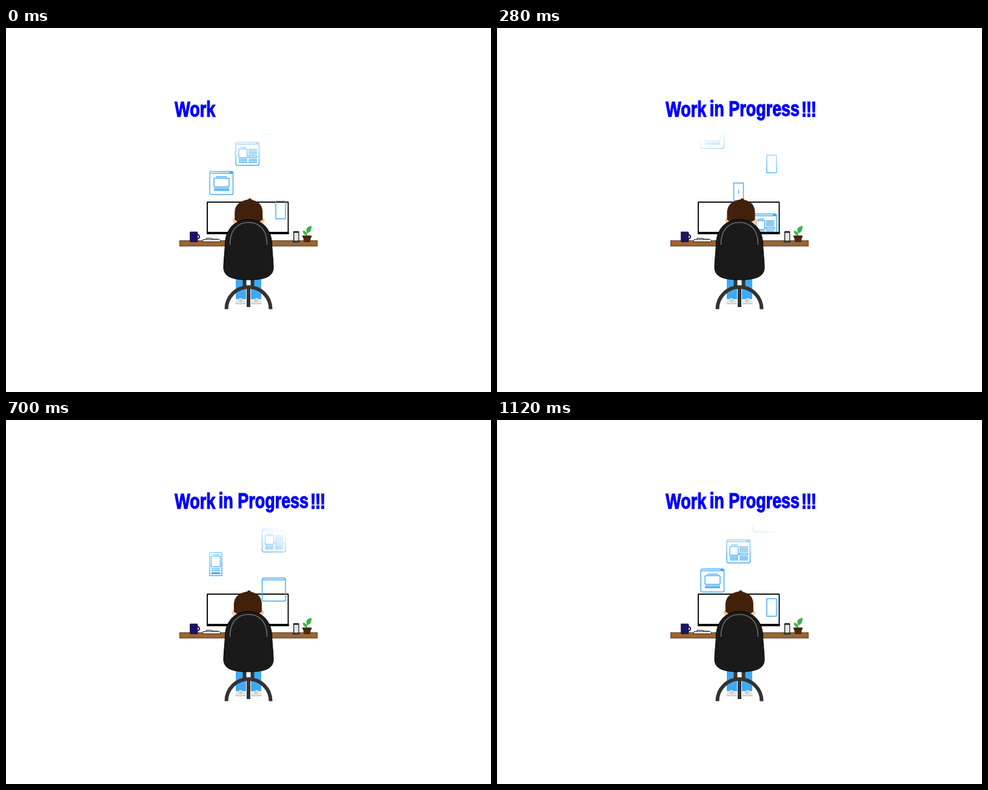
An HTML page for the animation above (1.19 s loop, 800x600 px).

```html
<!DOCTYPE html>
<html lang="en">
<head>
<meta charset="utf-8">
<title>Work in Progress</title>
<style>
  html, body { margin: 0; width: 100%; height: 100%; overflow: hidden; background: #fff; }
  svg { display: block; width: 100vw; height: 100vh; }
  .caption { font: bold 35px "Liberation Sans", Arial, sans-serif; fill: #00f; stroke: #00f; stroke-width: 1.3; }
  .sheet { fill: none; stroke: #3fa9f5; stroke-width: 1.4; }
</style>
</head>
<body>
<svg viewBox="0 0 800 600">
  <defs>
    <clipPath id="view"><rect x="300" y="169" width="200" height="167"/></clipPath>
    <radialGradient id="fade" gradientUnits="userSpaceOnUse" cx="400" cy="300" r="134">
      <stop offset=".56" stop-color="#fff" stop-opacity="0"/>
      <stop offset="1" stop-color="#fff"/>
    </radialGradient>
  </defs>

  <!-- condensed lettering -->
  <g class="caption" id="caption" transform="scale(.77 1)">
    <text x="361.500" y="146">Work</text>
    <text x="455.500" y="144.800">in</text>
    <text x="496.500" y="145.500">Progress</text>
    <text x="652" y="145.700" letter-spacing="-1.300">!!!</text>
  </g>

  <!-- desk and monitor -->
  <rect x="286.500" y="350.500" width="227" height="9" fill="#9b6532" stroke="#61401f"/>
  <rect x="332" y="287" width="133.500" height="52" rx=".5" fill="#fff" stroke="#111" stroke-width="2"/>
  <rect x="331" y="336" width="135.500" height="4" fill="#0b0a0c"/>

  <!-- mug, papers, phone, plant -->
  <circle cx="315.500" cy="344" r="3.600" fill="none" stroke="#1b1464" stroke-width="2"/>
  <rect x="303.500" y="336" width="12.500" height="16.500" rx="1" fill="#1b1464" stroke="#0e0a3c" stroke-width=".7"/>
  <path d="M325 348.500h27l1.500 1.500v2.500h-29zM330 348.500v-2h8l4 1.500h8" fill="#fff" stroke="#222"/>
  <path d="M326 350.500h26" stroke="#bbb"/>
  <rect x="474" y="335" width="9.500" height="18" rx="1" fill="#111"/>
  <rect x="475.300" y="337.500" width="7" height="13" fill="#e6e6e6"/>
  <path d="M472.500 351.500h12v2.500h-12z" fill="#444"/>
  <path d="M496 343V338Q499 334 502 329" fill="none" stroke="#1f9a45" stroke-width="1.200"/>
  <path d="M496.500 338Q492 328 504 326Q504 338 496.500 338Z" fill="#39b54a"/>
  <path d="M496.500 342Q490 341 489.500 334Q496 334 496.500 342Z" fill="#39b54a"/>
  <path d="M489 342h15v3h-1l-1.500 8h-10l-1.500-8h-1z" fill="#512a10"/>
  <path d="M490 345.500h13" stroke="#351a08"/>

  <g clip-path="url(#view)">
    <g class="sheet" id="sheets"></g>
    <rect x="330" y="169" width="140" height="110" fill="url(#fade)"/>
  </g>

  <g id="head">
    <circle cx="378.500" cy="317.500" r="5" fill="#fbc994"/>
    <circle cx="421.500" cy="317.500" r="5" fill="#fbc994"/>
    <path d="M377 316V303Q378 287 397 283Q400 283 401 280.500Q404 281 406 283.500Q422 287 423 302V316Q416 322 400 322T377 316Z" fill="#42210b"/>
  </g>

  <!-- legs and chair -->
  <path d="M379 410h17v37h-17zM404 410h17v37h-17z" fill="#3fa9f5"/>
  <g fill="#e3e3e3">
    <path d="M378.500 455.500v-6l4-2q4-5 8 0l5 2.500v5.500z"/>
    <path d="M404.500 455.500v-5.500l5-2.500q4-5 8 0l4 2v6z"/>
    <path d="M378.500 454.500h17m9 0h17" stroke="#bdbdbd"/>
    <path d="M385 448.500h4m-3 2h3m21-2h4m-3 2h3" stroke="#aaa"/>
  </g>
  <path d="M393.500 412v14M406.500 412v14" stroke="#333" stroke-width="6"/>
  <path d="M363.500 463.500A36.500 36.500 0 0 1 436.500 463.500M400 426v34" fill="none" stroke="#333" stroke-width="6"/>
  <path d="M400 315.500C421 315.500 437 330 438.500 354C439 371 441 382 441 396C440 411 424 415 400 415S360 411 359 396C359 382 361 371 361.500 354C363 330 379 315.500 400 315.500Z" fill="#1a1a1a" stroke="#000"/>
  <path d="M369.500 357.500C369 333 382 320.500 400 320.500S431 333 430.500 357.500" fill="none" stroke="#6b6b6b" stroke-width="1.700"/>
</svg>

<script>
const STEP = 70, STEPS = 17, TRAVEL = 326, EXIT = 125;
const byId = id => document.getElementById(id);

const box = (x, y, w, h, r = 1) => `<rect x="${x}" y="${y}" width="${w}" height="${h}" rx="${r}"/>`;
const lines = (x, w, ...ys) => `<path d="${ys.map(y => `M${x} ${y}h${w}`).join("")}"/>`;
const emptyPage = box(.5, .5, 38.5, 38, 2.5) + lines(.5, 38.5, 3.5);
const page = emptyPage + `<path d="M33 2h5" stroke-width="2.200"/>`;
const landing = page + lines(11, 18, 9) + box(7.5, 11.5, 25, 14.5, 2) +
  lines(7.5, 25, 28.5) + `<path d="M7.500 31h25" stroke-width="2.400"/>`;
const article = page + lines(8, 10, 9) + box(5.5, 11.5, 14, 14.5) +
  lines(5.5, 14, 28.5, 31, 33.5) + lines(21.5, 14, 12, 14.5, 17, 19.5, 28.5, 31, 33.5) +
  box(21.5, 22.5, 14, 3);
const phone = box(.5, .5, 16, 29, .5);
const phoneTick = phone + `<path d="M8.500 12v6"/>`;
const mobile = box(.5, .5, 20, 38) + lines(5, 12, 4) + box(3, 6.5, 15, 17.5) +
  lines(3, 15, 27.5, 30.5) + `<path d="M3 34.500h15" stroke-width="3"/>`;

// y is the height at the start of the loop
const sheets = [
  { x: 335.5, y: 236, art: landing },
  { x: 378.5, y: 188, art: article },
  { x: 422, y: 137, art: emptyPage },
  { x: 444.5, y: 285, art: phone },
  { x: 335.5, y: 421, art: mobile },
  { x: 422, y: 382, art: article },
  { x: 390, y: 331, art: phoneTick }
];
byId("sheets").innerHTML = sheets.map(s => `<g>${s.art}</g>`).join("");
const sheetNodes = [...byId("sheets").children];
const words = [...byId("caption").children];

function draw(time) {
  const step = Math.floor(time / STEP) % STEPS;
  const scroll = 19 * step + (step > 8 ? 13 : 0);
  sheets.forEach(({ x, y }, i) => {
    let top = y - scroll;
    if (top < EXIT) top += TRAVEL;
    sheetNodes[i].setAttribute("transform", `translate(${x} ${top})`);
  });
  words.forEach((word, i) => word.setAttribute("visibility", i <= step ? "visible" : "hidden"));
  const sway = .25 + 2.2 * Math.sin(2 * Math.PI * step / 16.5);
  byId("head").setAttribute("transform", `translate(${sway.toFixed(2)} 0)`);
}

const start = performance.now();
function tick() {
  draw(performance.now() - start);
  requestAnimationFrame(tick);
}
draw(0);
tick();
</script>
</body>
</html>
```
